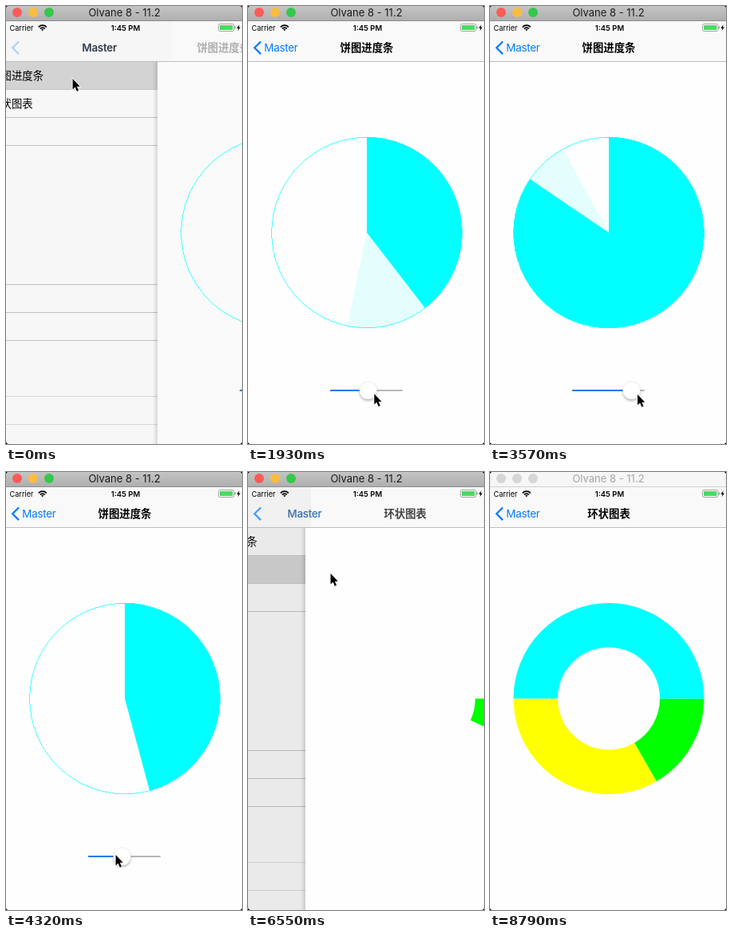
An HTML page that plays this animation: 296 px wide and 548 px high, repeating every 8890 ms.

```html
<!DOCTYPE html>
<html lang="zh-CN">
<head>
<meta charset="utf-8">
<title>Chart demo</title>
<style>
html, body { margin: 0; width: 100%; height: 100%; overflow: hidden; background: #000; }
svg { display: block; width: 296px; height: 548px; }
text { font-family: Inter, "Noto Sans CJK SC", "Noto Sans CJK", sans-serif; font-size: 13.4px; }
.mid { text-anchor: middle; }
.bold { font-weight: 600; }
</style>
</head>
<body>
<svg viewBox="0 0 296 548">
  <defs>
    <linearGradient id="chrome" x2="0" y2="1">
      <stop stop-color="#c4c4c4"/><stop offset="1" stop-color="#aeaeae"/>
    </linearGradient>
    <linearGradient id="edge">
      <stop stop-opacity="0"/><stop offset="1" stop-opacity=".13"/>
    </linearGradient>
    <filter id="soft" x="-50%" y="-50%" width="200%" height="200%">
      <feDropShadow dx="0" dy="2" stdDeviation="1.5" flood-opacity=".28"/>
    </filter>
    <clipPath id="win"><rect width="296" height="548" rx="4"/></clipPath>
  </defs>
  <g clip-path="url(#win)">
    <rect width="296" height="548" fill="#fefefe"/>

    <g id="list">
      <g id="lines"></g>
      <rect id="mark" width="400" height="35" fill="#d9d9d9"/>
      <text x="12" y="92">饼图进度条</text>
      <text x="12" y="126.5">环状图表</text>
    </g>
    <rect id="dim" y="69" height="479"/>
    <rect id="shade" y="69" width="6" height="479" fill="url(#edge)"/>

    <g id="page">
      <rect id="paper" y="69" width="296" height="479"/>
      <g id="pie">
        <circle cx="149" cy="283.5" r="119.3" fill="none" stroke="#0ff" stroke-width=".7" shape-rendering="crispEdges"/>
        <path id="ghost" fill="#0ff"/>
        <path id="slice" fill="#0ff"/>
        <rect x="103" y="480" width="91" height="2" rx="1" fill="#b6b7b8"/>
        <rect id="fill" x="103" y="480" height="2" rx="1" fill="#0f7bea"/>
        <circle id="knob" cy="481" r="11" fill="#fff" stroke="#000" stroke-opacity=".1" stroke-width=".6" filter="url(#soft)"/>
      </g>
      <g id="ring" fill="none" stroke-width="55.5"></g>
    </g>

    <rect y="19" width="296" height="50" fill="#f9f9f9"/>
    <rect id="tint" y="19" height="50"/>
    <rect y="69" width="296" height="1" fill="#bdbdbf"/>
    <path id="chevron" d="M16 44.5L8.2 52.3L16 60.1" fill="none" stroke="#007aff" stroke-width="2.2"/>
    <text id="back" class="mid" y="57" fill="#007aff" letter-spacing="-.25">Master</text>
    <text id="home" class="mid bold" y="57" letter-spacing="-.25">Master</text>
    <text id="title" class="mid bold" y="57.3"></text>

    <text x="4.5" y="30.5" style="font-size:9.2px">Carrier</text>
    <path d="M40.8 26.3a7 7 0 0 1 10 0M42.8 28.4a4.2 4.2 0 0 1 6 0" fill="none" stroke="#000" stroke-width="1.7"/>
    <path d="M45.8 31.3l-1.6-1.8a2.3 2.3 0 0 1 3.2 0z"/>
    <text class="mid bold" x="150" y="30.5" style="font-size:9.5px">1:45 PM</text>
    <rect x="266.5" y="22.5" width="19.5" height="9" rx="2" fill="#fff" stroke="#8d8d8d" stroke-width=".8"/>
    <rect x="268" y="24" width="16.5" height="6" rx=".8" fill="#4cd964"/>
    <rect x="286.7" y="25.5" width="1.2" height="3" fill="#8d8d8d"/>
    <path d="M292.6 23.3L289.4 27.7H291.4L290.7 31L294 26.4H292Z"/>

    <rect id="bar" width="296" height="19"/>
    <rect id="rim" y="18" width="296" height="1"/>
    <g id="lights"></g>
    <text id="name" class="mid" x="148.5" y="13" style="font-size:13px">Olvane 8 - 11.2</text>

    <path id="cursor" d="M.6 1V14.4L3.6 11.6L5.9 16.8L8.1 15.8L5.9 10.8H9.8Z" stroke="#fff" stroke-width="1.6" paint-order="stroke"/>
  </g>
</svg>
<script>
const LOOP = 8890, TICK = 148.8, WIDTH = 296, CX = 149, CY = 283.5, R = 119.5;
const el = id => document.getElementById(id);
const set = (node, attrs) => {
  for (const k in attrs) node.setAttribute(k, attrs[k]);
  return node;
};
const add = (parent, tag, attrs) =>
  parent.appendChild(set(document.createElementNS('http://www.w3.org/2000/svg', tag), attrs));

// all times below are in ticks
const POP = 37, SECOND = 43, DONE = 59;
const drag = [[9, .2], [13, .59], [16, .225], [19, .405], [23, .92], [27, .348], [28, .458]];
const path = [[0, 83, 90], [4, 103, 190], [7, 134, 484], [27, 145, 485], [29, 137, 478],
  [36, 40, 59], [37, 39, 58], [41, 103, 126], [44, 103, 126], [52, 170, 570]];

// eased value between key points
function glide(keys, k, col = 1) {
  const i = keys.findIndex(key => key[0] > k);
  if (i < 1) return keys[i < 0 ? keys.length - 1 : 0][col];
  const a = keys[i - 1], b = keys[i];
  const u = (1 - Math.cos(Math.PI * (k - a[0]) / (b[0] - a[0]))) / 2;
  return a[col] + (b[col] - a[col]) * u;
}

// distance left in a critically damped slide
function spring(x) {
  const left = x < 0 ? 1 : (1 + x) * Math.exp(-x);
  return left < .01 ? 0 : left;
}

// share of the list that is uncovered
function uncovered(k, lag = 0) {
  if (k >= SECOND) return spring(1.257 + 1.48 * (k - SECOND) - lag);
  if (k >= POP) return 1 - spring(.906 + 1.48 * (k - POP) - lag);
  return spring(1.257 + 1.48 * k - lag);
}

// degrees run clockwise from the right
function arc(r, from, to) {
  const pt = d => {
    const a = d * Math.PI / 180;
    return (CX + r * Math.cos(a)).toFixed(2) + ' ' + (CY + r * Math.sin(a)).toFixed(2);
  };
  return `M${pt(from)}A${r} ${r} 0 ${to - from > 180 ? 1 : 0} 1 ${pt(to)}`;
}
const wedge = (a, b) => b - a < .001 ? '' : arc(R, a * 360 - 90, b * 360 - 90) + `L${CX} ${CY}Z`;

for (const row of [1, 2, 3, 8, 9, 10, 12, 13])
  add(el('lines'), 'rect', {
    x: 12, y: Math.round(69 + 34.9 * row), width: 400, height: 1, fill: row > 10 ? '#dededf' : '#c6c6c8'
  });

const lights = ['#fc5b57', '#fdbc40', '#34c84a'].map((color, i) =>
  [add(el('lights'), 'circle', { cx: 14 + 20 * i, cy: 8, r: 6 }), color]);

const arcs = [[0, 60, '#0f0'], [60, 180, '#ff0'], [180, 360, '#0ff']].map(([from, to, stroke]) =>
  ({ from, to, node: add(el('ring'), 'path', { stroke }) }));

function drawNav(k, second) {
  const off = Math.round(WIDTH * uncovered(k));
  const q = uncovered(k, .17);
  const popping = k >= POP && !second;
  const dim = .12 * (1 - off / WIDTH) ** 1.5;
  const label = popping ? Math.max(0, 1 - 4 * q) : 1 - q;
  const x = 41.5 + 107.5 * q;
  set(el('list'), { transform: `translate(${.3 * (off - WIDTH)})` });
  set(el('dim'), { width: off, 'fill-opacity': dim });
  set(el('tint'), { width: off * 1.1, 'fill-opacity': dim * .4 });
  set(el('shade'), { x: off - 6 });
  set(el('page'), { transform: `translate(${off})` });
  set(el('paper'), { fill: off > WIDTH / 2 ? '#fafafa' : '#fefefe' });
  set(el('mark'), { y: second ? 104.5 : 69.5, opacity: popping ? 0 : 1 });
  set(el('chevron'), { opacity: label });
  set(el('back'), { x, opacity: label });
  set(el('home'), { x, opacity: q });
  set(el('title'), { x: CX + 176 * q, opacity: 1 - q });
  el('title').textContent = second ? '环状图表' : '饼图进度条';
}

const knobX = k => 114 + 69 * glide(drag, k);

function drawPie(k) {
  const now = glide(drag, k), old = glide(drag, k - 1);
  const low = Math.min(now, old), x = knobX(k);
  set(el('slice'), { d: wedge(0, low) });
  set(el('ghost'), { d: wedge(low, Math.max(now, old)), opacity: now > old ? .1 : .9 });
  set(el('fill'), { width: x - 103 });
  set(el('knob'), { cx: x });
}

function drawRing(k) {
  const sweep = Math.min(360, 25 + 27.9 * (k - SECOND - 1));
  for (const { from, to, node } of arcs)
    set(node, { d: sweep > from ? arc(91.75, from, Math.min(sweep, to)) : '' });
}

function drawWindow(active) {
  set(el('bar'), { fill: active ? 'url(#chrome)' : '#f6f6f6' });
  set(el('rim'), { fill: active ? '#8e8e8e' : '#d0d0d0' });
  set(el('name'), { fill: active ? '#1c1c1c' : '#a5a5a5' });
  for (const [dot, color] of lights) set(dot, { fill: active ? color : '#d6d6d6' });
}

function drawCursor(k) {
  const held = k >= 7 && k < 27;
  const x = held ? knobX(k) + 7 : glide(path, k);
  set(el('cursor'), { transform: `translate(${x} ${glide(path, k, 2)})` });
}

function draw(time) {
  const k = Math.floor(time % LOOP / TICK), second = k >= SECOND;
  drawNav(k, second);
  set(el('pie'), { display: second ? 'none' : 'inline' });
  set(el('ring'), { display: second ? 'inline' : 'none' });
  if (second) drawRing(k); else drawPie(k);
  drawWindow(k < DONE);
  drawCursor(k);
}

const begin = performance.now();
function tick() {
  draw(performance.now() - begin);
  requestAnimationFrame(tick);
}
tick();
</script>
</body>
</html>
```
